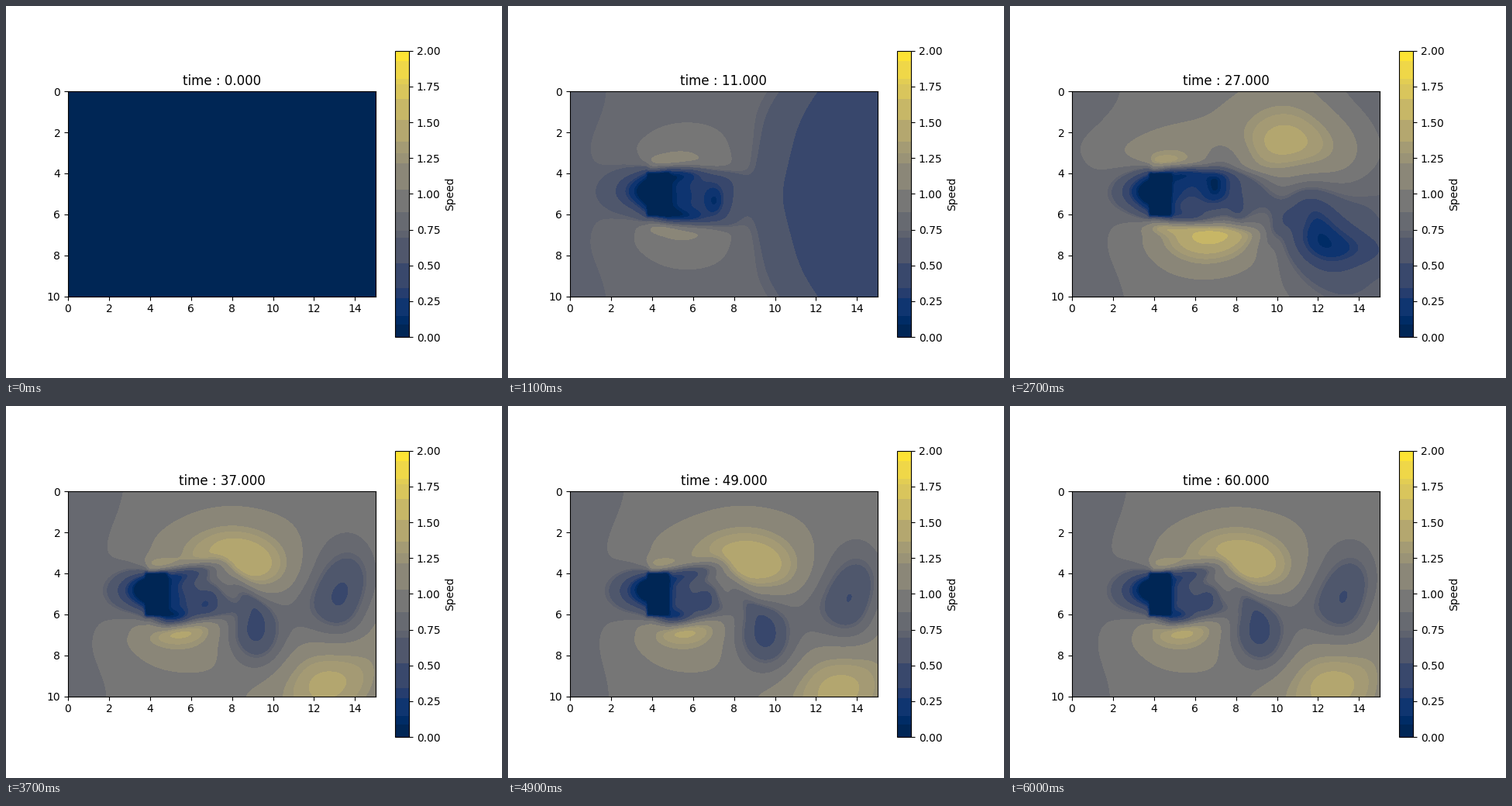
A matplotlib script for the animation above (6100 ms loop, 640x480 px).

```python
import numpy as np
import matplotlib.pyplot as plt
from matplotlib.animation import FuncAnimation
from matplotlib.colors import ListedColormap

FRAMES = 61
PERIOD = 11.5        # shedding period, two vortices each
T_REF = 37.0         # time of zero shedding phase
FIRST_BIRTH = 20.25  # shedding time of the first vortex

x, y = np.meshgrid((np.arange(300) + 0.5) / 20, (np.arange(200) + 0.5) / 20)

# Speed limits of the colour bands
BOUNDS = np.array([0, .084, .149, .274, .34, .517, .695, .745, .874, 1.03, 1.21,
                   1.286, 1.367, 1.518, 1.664, 1.767, 1.805, 1.935, 2.0])


def banded_cmap():
    values = np.linspace(0, 2, 256)
    band = np.clip(np.searchsorted(BOUNDS, values, "right") - 1, 0, len(BOUNDS) - 2)
    mids = (BOUNDS[:-1] + BOUNDS[1:]) / 2
    return ListedColormap(plt.get_cmap("cividis")(mids[band] / 2))


def sigmoid(z):
    return 0.5 * (1 + np.tanh(z / 2))


def smoothstep(z):
    z = np.clip(z, 0, 1)
    return z * z * (3 - 2 * z)


def bump(t, center, width):
    return np.exp(-((t - center) / width) ** 2)


def rotated(x0, y0, angle):
    a = np.radians(angle)
    dx, dy = x - x0, y - y0
    return dx * np.cos(a) + dy * np.sin(a), dy * np.cos(a) - dx * np.sin(a)


def blob(x0, y0, length, width, angle, strength):
    u, v = rotated(x0, y0, angle)
    return strength * np.exp(-(u / length) ** 2 - (v / width) ** 2)


def background(t, ramp, c, grow):
    """Inflow that speeds up and pushes a front to the right."""
    inflow = 0.88 * ramp
    outflow = min(0.80, 0.9 * (1 - np.exp(-t / 18)))
    front = 8.6 + 2.4 * smoothstep(t / 40) + 1.8 * ((y - 5) / 5) ** 2
    shear = 0.015 * grow * c * (y - 5) / 5 * sigmoid(4 - x)
    return (inflow + (outflow - inflow) * sigmoid((x - front) / 0.8)
            + ramp * (0.05 * np.tanh((x - 2.5) / 1.5) + shear))


def block_flow():
    """Stagnation in front of the block and fast flow at its corners."""
    field = blob(3.8, 4.85, 1.5, 1.0, 0, -0.87) * sigmoid((3.85 - x) / 0.06)
    for side in (-1, 1):
        field += blob(4.4, 5.05 + 1.55 * side, 0.9, 0.35, 0, 0.22)
    return field


def near_wake(t, c, grow):
    """Slow bubble behind the block, swinging with the shedding phase."""
    stretch = bump(t, 23, 10)
    length = 1.9 + 1.1 * stretch
    wx = 3.7 + 1.05 * length
    tilt = 5 - 20 * c * grow
    depth = 0.58 - 0.13 * sigmoid((t - 41) / 2)

    u, v = rotated(wx, 5.15 - 0.1 * c, tilt * (1 - 0.6 * stretch))
    field = -depth * np.exp(-(u / length) ** 4 - (v / 1.4) ** 6)
    field *= 1 + 0.7 * np.exp(-np.maximum(x - 4.85, 0) / 0.7)
    field += blob(wx + 0.5 * length, 5.2 + 0.6 * stretch, 0.6, 0.4, 90 + 30 * c, -0.25)

    tail_y = 5.75 + 2.4 * np.sin(np.radians(tilt))
    for side in (-1, 1):
        near = 0.5 * (1 + side * c)
        far = 1 - near
        field += blob(5.3 + 0.6 * far, 5.05 + 1.05 * side, 0.7 + 0.7 * far, 0.35,
                      12 * side * far, -0.28)
        field += blob(wx + length + 0.5, tail_y - 0.45 * side, 1.5, 0.5,
                      50 * side, -0.3 * near * grow)
    return field, wx, length


def side_flow(t, c, sn, grow, wx, length):
    """Fast layers passing above and below the bubble."""
    field = np.zeros_like(x)
    for side in (-1, 1):
        near = 0.5 * (1 + side * c)
        fx = wx - 0.2 + side * sn * grow
        fy = 5.1 + 1.75 * side
        field += blob(fx, fy, length, 0.65, -8 * side, 0.22 * near)
        field += blob(fx, fy + 0.4 * side, 1.4 * length, 1.6, 0, 0.12 + 0.14 * near)
    return field


def vortex_street(t, time):
    """Velocity of vortices shed in turn from the two sides."""
    u, v = np.zeros_like(x), np.zeros_like(x)
    drift = 0.13 * sigmoid((t - 32) / 2)
    for n in range(8):
        age = time - FIRST_BIRTH - n * PERIOD / 2
        if age <= 0:
            continue
        spin = 1 if n % 2 == 0 else -1
        dx = x - 4.7 - 0.8 * age
        dy = y - 5.0 - drift * age + 0.5 * spin
        height = 1.1 + 0.12 * age
        fast = sigmoid(-3 * spin * dy / height)
        width = (0.8 + 0.07 * age) * (1 + 0.6 * fast)
        dx = (dx - 0.2 * spin * dy) / width
        dy = dy / height
        swirl = 0.55 * spin * smoothstep(age / 4) * np.exp(0.5 - 0.5 * (dx ** 2 + dy ** 2))
        u -= swirl * dy
        v += 0.7 * swirl * dx
    return u, v


def speed(t):
    ramp = 1 - np.exp(-t / 5.5)
    grow = smoothstep((t - 12) / 14)
    time = t + 1.8 * np.clip((T_REF - t) / 10, 0, 1)
    phase = 2 * np.pi * (time - T_REF) / PERIOD
    c, sn = np.cos(phase) * grow, np.sin(phase)

    wake, wx, length = near_wake(t, c, grow)
    field = wake + block_flow() + side_flow(t, c, sn, grow, wx, length)
    field += blob(13.5 + 0.7 * (t - 27), 7.6, 2.6, 0.9, 5, -0.25 * bump(t, 27, 5))

    u, v = vortex_street(t, time)
    u += background(t, ramp, c, grow) + ramp * field
    block = (sigmoid((x - 3.74) / 0.03) * sigmoid((4.87 - x) / 0.05)
             * sigmoid((y - 3.93) / 0.04) * sigmoid((6.1 - y) / 0.04))
    return np.clip(np.hypot(np.maximum(u, 0), v) * (1 - block), 0, 2)


fig, ax = plt.subplots(figsize=(6.4, 4.8), dpi=100)
image = ax.imshow(speed(0), cmap=banded_cmap(), vmin=0, vmax=2,
                  extent=(0, 15, 10, 0), interpolation="bilinear")
fig.colorbar(image, ax=ax, label="Speed")
title = ax.set_title("time : 0.000")


def update(i):
    image.set_data(speed(i))
    title.set_text(f"time : {i:.3f}")
    return image, title


anim = FuncAnimation(fig, update, frames=FRAMES, interval=100, repeat=True, repeat_delay=0)
plt.show()
```
